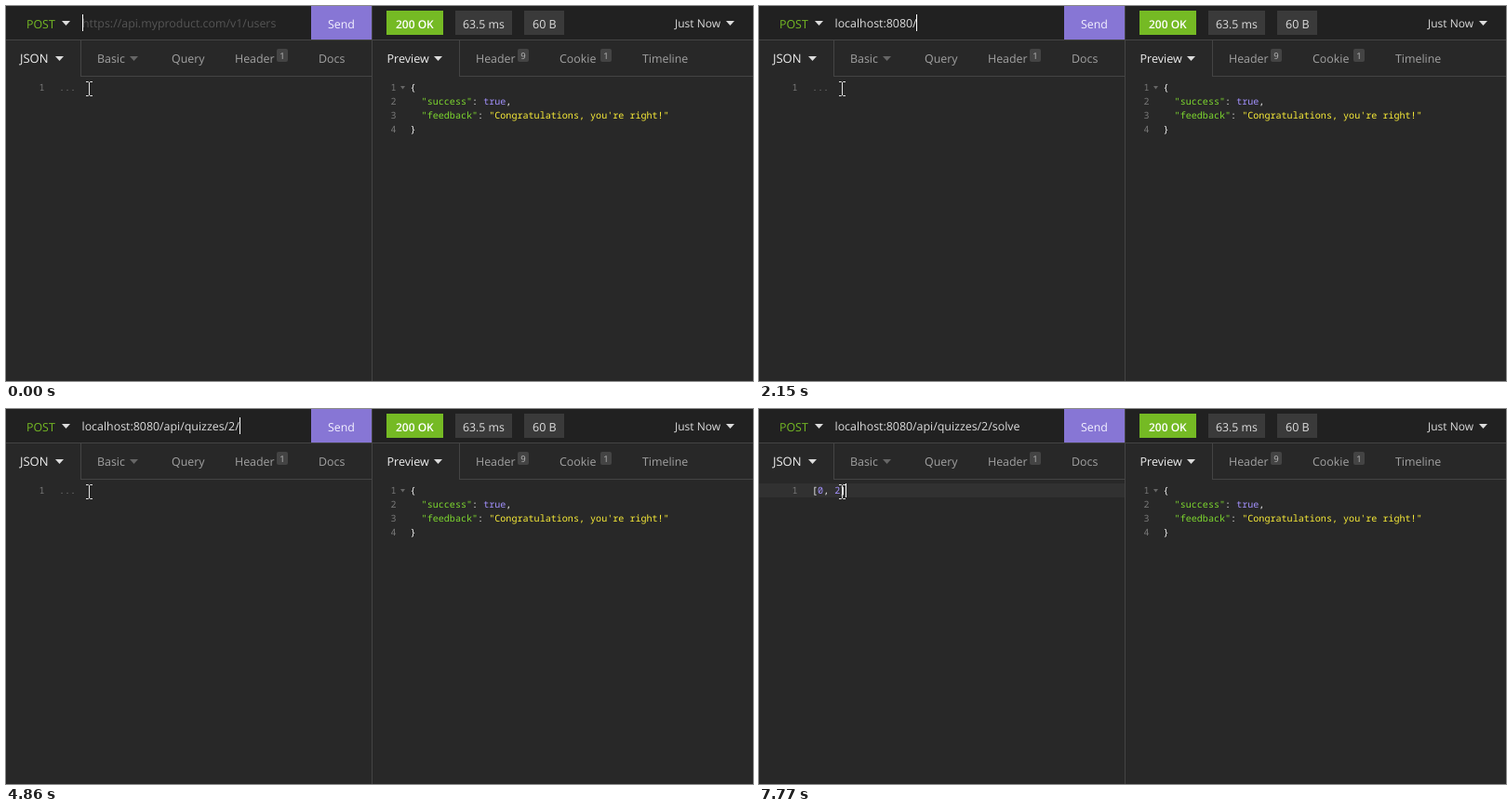
An HTML page that plays this animation: 803 by 403 pixels, repeating every 8000 ms.

```html
<!DOCTYPE html>
<html lang="en">
<head>
<meta charset="utf-8">
<title>REST client</title>
<style>
html, body { margin: 0; width: 100%; height: 100%; overflow: hidden; background: #282828; }
svg { display: block; }
text { font: 12.4px "Open Sans", "Noto Sans", sans-serif; fill: #a3a3a3; white-space: pre; text-rendering: geometricPrecision; }
.mono { font: 10.08px "Noto Sans Mono", "DejaVu Sans Mono", monospace; fill: #f2f2f2; }
.num { fill: #787878; }
.key { fill: #7ed92f; }
.str { fill: #fbee38; }
.val { fill: #a492ff; }
.lit { fill: #eee; }
.dim { fill: #555; }
.badge { font-size: 9.5px; fill: #bbb; text-anchor: middle; }
</style>
</head>
<body>
<svg id="stage" width="803" height="403" viewBox="0 0 803 403">
  <rect width="803" height="403" fill="#282828"/>
  <rect width="803" height="36" fill="#212121"/>
  <g fill="#444">
    <rect y="36" width="803" height="1"/>
    <rect x="80" y="75" width="313" height="1"/>
    <rect x="487" y="75" width="316" height="1"/>
    <rect x="80" y="37" width="1" height="39"/>
    <rect x="487" y="37" width="1" height="39"/>
    <rect x="393" width="1" height="403"/>
  </g>
  <rect x="328" width="65" height="36" fill="#8776d5"/>
  <rect x="409" y="5" width="61" height="26" fill="#75ba24"/>
  <rect x="483" y="5" width="61" height="26" fill="#3a3a3a"/>
  <rect x="557" y="5" width="43" height="26" fill="#3a3a3a"/>
  <rect id="activeLine" y="80" width="393" height="15" fill="#313131"/>

  <g id="labels"></g>

  <text id="hint" class="dim" x="82" y="23">https://api.myproduct.com/v1/users</text>
  <text id="url" x="81.5" y="23" style="fill:#ddd"></text>
  <rect id="urlCaret" y="9" width="1" height="18" fill="#fff"/>

  <text class="mono num" x="35.5" y="91">1</text>
  <text id="dots" class="mono" x="57" y="91" style="fill:#777">...</text>
  <text id="body" class="mono" x="57" y="91">[<tspan class="val">0</tspan>, <tspan class="val">2</tspan>]</text>
  <rect id="bodyCaret" y="80" width="1" height="15" fill="#fff"/>

  <g class="mono">
    <text class="mono" x="434.5" y="91">{</text>
    <text class="mono" x="434.5" y="106">  <tspan class="key">"success"</tspan>: <tspan class="val">true</tspan>,</text>
    <text class="mono" x="434.5" y="121">  <tspan class="key">"feedback"</tspan>: <tspan class="str">"Congratulations, you're right!"</tspan></text>
    <text class="mono" x="434.5" y="136">}</text>
  </g>
  <path d="M424 86h5l-2.5 3.5z" fill="#666"/>
  <path d="M86 81.5h2.5l1 1l1-1H93M89.5 82v14M86 96.5h2.5l1-1l1 1H93" fill="none" stroke="#e4e4e4"/>
</svg>
<script>
const LOOP = 8000;
const URL_TEXT = "localhost:8080/api/quizzes/2/solve";
const CARET_OFF = 6010, CARET_ON = 6550, FOCUS = 6690, BLINK = 7230, PASTE = 7770;

const $ = id => document.getElementById(id);
const spread = (from, to, n) =>
  Array.from({ length: n }, (_, i) => from + (to - from) * i / (n - 1));

// When each character of the address is typed
const keyTimes = [
  ...spread(130, 1140, 9),
  ...spread(1410, 2150, 6), 2360, 2430,
  ...spread(2640, 3000, 3),
  3510, ...spread(3650, 4490, 7),
  4860, ...spread(5030, 5510, 5)
];

function add(tag, attrs, content = "") {
  const el = document.createElementNS("http://www.w3.org/2000/svg", tag);
  for (const name in attrs) el.setAttribute(name, attrs[name]);
  el.textContent = content;
  $("labels").append(el);
}

function label(content, x, y, fill, size = 12.4, weight = 400) {
  add("text", { x, y, style: `fill:${fill};font-size:${size}px;font-weight:${weight}` }, content);
}

function arrow(x, y, fill = "#ddd") {
  add("path", { d: `M${x} ${y}h9l-4.5 5z`, fill });
}

function badge(content, x) {
  add("rect", { x, y: 46, width: 12, height: 14, rx: 2, fill: "#444" });
  add("text", { x: x + 6, y: 56.5, class: "badge" }, content);
}

label("POST", 22, 24, "#75ba24");
label("Send", 346, 24, "#f4f2ff");
label("200 OK", 419, 24, "#fff", 12, 600);
label("63.5 ms", 491, 24, "#ddd", 12.3);
label("60 B", 566, 24, "#ddd", 12.5);
label("Just Now", 719, 23, "#ddd", 12);
label("JSON", 15, 61, "#eee", 13);
label("Preview", 409.5, 61, "#eee", 12.6);
for (const [name, x] of [["Basic", 98], ["Query", 178], ["Header", 246], ["Docs", 336],
                         ["Header", 505], ["Cookie", 595], ["Timeline", 684]])
  label(name, x, 61, "#a3a3a3");
arrow(60, 16);
arrow(53, 54);
arrow(133, 54, "#666");
arrow(460, 54);
arrow(774, 16);
badge("1", 291);
badge("9", 550);
badge("1", 639);
for (let line = 1; line <= 4; line++)
  add("text", { x: 413.5, y: 76 + 15 * line, class: "mono num" }, line);

function show(id, on) {
  $(id).setAttribute("visibility", on ? "visible" : "hidden");
}

function draw(t) {
  const typed = keyTimes.filter(k => k <= t).length;
  const pasted = t >= PASTE;
  const url = $("url");
  const value = URL_TEXT.slice(0, typed);
  if (url.textContent !== value) url.textContent = value;
  const caretX = typed ? Math.round(81.3 + url.getComputedTextLength()) : 82;
  $("urlCaret").setAttribute("x", caretX);
  $("bodyCaret").setAttribute("x", pasted ? 93 : 57);
  show("hint", !typed);
  show("urlCaret", t < CARET_OFF || (t >= CARET_ON && t < FOCUS));
  show("bodyCaret", (t >= FOCUS && t < BLINK) || pasted);
  show("activeLine", t >= FOCUS);
  show("dots", !pasted);
  show("body", pasted);
}

const start = performance.now();
function tick() {
  draw((performance.now() - start) % LOOP);
  requestAnimationFrame(tick);
}
tick();
</script>
</body>
</html>
```
